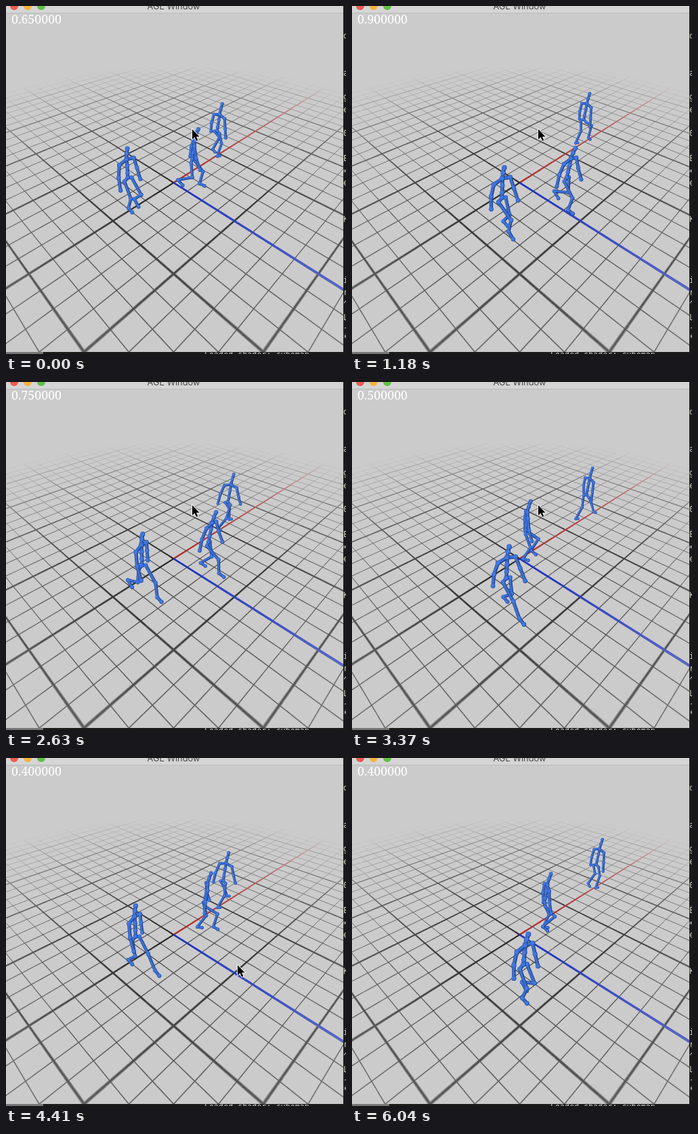
Write an HTML page with a canvas that moves like this. It is 502x514 px and loops after 6140 ms.

```html
<!DOCTYPE html>
<html>
<head>
<meta charset="utf-8">
<style>
html, body { margin: 0; width: 100%; height: 100%; overflow: hidden; background: #cbcbcb; }
canvas { display: block; }
</style>
</head>
<body>
<canvas id="stage" width="502" height="514"></canvas>
<script>
const LOOP = 6140, STEP = 147.2, CYCLE = 13.85;
const BG = 203;
const ctx = document.getElementById('stage').getContext('2d');
const backdrop = document.createElement('canvas');
backdrop.width = 502;
backdrop.height = 514;

// Camera looks at the origin along the diagonal between the red and blue axes.
const FOCAL = 431, DIST = 5.586, SIN = 0.63, COS = 0.7765;
function project(u, v, h = 0) {
  const side = u + v, ahead = u - v, up = h * Math.SQRT2;
  const depth = DIST + ahead * COS - up * SIN;
  return {
    x: 247.5 + FOCAL * side / depth,
    y: 261 - FOCAL * (ahead * SIN + up * COS) / depth,
    depth
  };
}

function line(g, a, b, width, color) {
  g.lineWidth = width;
  g.strokeStyle = color;
  g.beginPath();
  g.moveTo(a.x, a.y);
  g.lineTo(b.x, b.y);
  g.stroke();
}

function dot(g, x, y, r, color) {
  g.fillStyle = color;
  g.beginPath();
  g.arc(x, y, r, 0, 7);
  g.fill();
}

function text(g, str, x, y, font, color, align = 'left') {
  g.font = font;
  g.fillStyle = color;
  g.textAlign = align;
  g.fillText(str, x, y);
}

// One grid line, faded with the distance from the origin.
function gridLine(at, rgb, { power, width, strength }, from = -50) {
  for (let i = from; i < 50; i++) {
    const p = i / 10, q = p + 0.1;
    const fade = 1 - Math.pow(Math.hypot(at[0] * p + at[2], at[1] * p + at[3]) * Math.SQRT2 / 7, 1.3);
    if (fade <= 0) continue;
    const a = project(at[0] * p + at[2], at[1] * p + at[3]);
    const b = project(at[0] * q + at[2], at[1] * q + at[3]);
    const near = Math.min(a.depth, b.depth) / DIST;
    if (near < 0.3) continue;
    const mix = rgb.map(c => Math.round(BG + (c - BG) * fade * strength));
    line(g, a, b, width / Math.pow(near, power), `rgb(${mix})`);
  }
}

const g = backdrop.getContext('2d');
function gridLayer(bold, style) {
  for (let i = -20; i <= 20; i++) {
    if ((i % 4 === 0) !== bold) continue;
    gridLine([1, 0, 0, i / 4], [20, 20, 20], style);
    gridLine([0, 1, i / 4, 0], [20, 20, 20], style);
  }
}

function drawBackdrop() {
  g.fillStyle = `rgb(${BG},${BG},${BG})`;
  g.fillRect(0, 0, 502, 514);
  gridLayer(true, { power: 1.8, width: 2.2, strength: 0.5 });
  gridLayer(false, { power: 1, width: 1, strength: 0.8 });
  gridLayer(true, { power: 1.2, width: 1.5, strength: 0.95 });
  gridLine([1, 0, 0, 0], [200, 40, 40], { power: 1.2, width: 2, strength: 1 }, 0);
  gridLine([0, 1, 0, 0], [25, 50, 205], { power: 1.2, width: 2.3, strength: 1 }, 0);

  g.fillStyle = '#d5d5d5';
  g.fillRect(0, 0, 498, 10);
  g.fillStyle = '#bcbcbc';
  g.fillRect(0, 10, 498, 1);
  ['#f0584f', '#f5b43c', '#60c143'].forEach((c, i) => dot(g, 12 + 20 * i, 0, 6, c));
  text(g, 'AGL Window', 247.5, 5, '12.8px Inter, sans-serif', '#484848', 'center');

  g.fillStyle = '#1a1c1c';
  g.fillRect(498, 0, 4, 514);
  g.fillRect(0, 511, 502, 3);
  g.fillStyle = '#777';
  g.fillRect(0, 511, 55, 3);
  const mono = '11.7px "DejaVu Sans Mono", monospace';
  text(g, 'Loaded shader: cubemap', 293, 519, mono, '#c8c8c8');
  const rows = { 48: 'd', 103: 'a', 138: 'g', 157: 'e', 192: '0', 229: 'E', 247: '=', 265: 'e',
    319: 'K', 409: 'i', 427: 'r', 445: '^', 464: 'L', 479: '-', 494: '*' };
  for (const y in rows) text(g, rows[y], 498, +y, mono, '#d0d0b8');
}

function bones(points) {
  const width = p => 0.052 * FOCAL / p.depth;
  for (let i = 1; i < points.length; i++) {
    line(ctx, points[i - 1], points[i], width(points[i]), '#24468f');
  }
  for (const p of points) dot(ctx, p.x, p.y, width(p) * 0.64, '#264c9c');
  const lift = p => ({ x: p.x - 0.5, y: p.y - 0.4 });
  for (let i = 1; i < points.length; i++) {
    line(ctx, lift(points[i - 1]), lift(points[i]), width(points[i]) * 0.6, '#3c70d6');
  }
  for (const p of points) dot(ctx, p.x - 0.3, p.y - 0.3, width(p) * 0.5, '#4179e4');
}

// Walker at (u, v) heading along (du, dv); c is the position in the gait, 0 to 1.
function walker(u, v, du, dv, c, stride, size) {
  const len = Math.hypot(du, dv), fu = du / len, fv = dv / len;
  const at = (fwd, left, h) => project(
    u + size * (fu * fwd + fv * left), v + size * (fv * fwd - fu * left), size * h);
  const sway = Math.sin(2 * Math.PI * c);
  const hipA = 0.025, hipH = 0.43 + 0.015 * Math.cos(4 * Math.PI * c);

  function leg(side) {
    const t = (c + 0.3 + (side > 0 ? 0.5 : 0)) % 1;
    let a = 0.03, h = 0.035;
    if (t < 0.6) {
      a += stride * (0.3 - t);
      h += 0.07 * Math.max(0, (t - 0.4) / 0.2) ** 2;
    } else {
      const k = (t - 0.6) / 0.4;
      a += stride * (-0.3 + 0.6 * k * k * (3 - 2 * k));
      h += 0.07 * (1 - k) + 0.05 * Math.sin(Math.PI * k);
    }
    // The foot keeps its height and comes in where the leg is too short.
    const thigh = 0.225, shin = 0.215, drop = hipH - h;
    const far = Math.sqrt((thigh + shin - 0.001) ** 2 - drop ** 2);
    const fwd = Math.max(-far, Math.min(far, a - hipA));
    const reach = Math.hypot(fwd, drop);
    const knee = Math.atan2(fwd, drop) +
      Math.acos((thigh ** 2 + reach ** 2 - shin ** 2) / (2 * thigh * reach));
    const l = side * 0.05;
    bones([
      at(hipA, 0, hipH + 0.03),
      at(hipA, l, hipH),
      at(hipA + thigh * Math.sin(knee), l, hipH - thigh * Math.cos(knee)),
      at(hipA + fwd, l, h),
      at(hipA + fwd + 0.07, l, 0.012 + (h - 0.035) * 0.3)
    ]);
  }

  function arm(side) {
    const swing = -side * 0.27 * sway, twist = -0.3 * sway;
    const l = side * 0.097 * Math.cos(twist), a = 0.04 + side * 0.097 * Math.sin(twist);
    const elbowA = a + 0.15 * Math.sin(swing), elbowH = 0.7 - 0.15 * Math.cos(swing);
    const fore = swing + 0.15;
    bones([
      at(0.045, 0, 0.73),
      at(a, l, 0.7),
      at(elbowA, l + side * 0.03, elbowH),
      at(elbowA + 0.16 * Math.sin(fore), l + side * 0.045, elbowH - 0.16 * Math.cos(fore))
    ]);
  }

  leg(1);
  arm(1);
  bones([at(hipA, 0, hipH + 0.03), at(0.03, 0, 0.54), at(0.04, 0, 0.64),
    at(0.045, 0, 0.74), at(0.06, 0, 0.81), at(0.08, 0, 0.88)]);
  leg(-1);
  arm(-1);
}

function pointer(x, y) {
  const outline = [[0, 0], [0, 15], [3.5, 11.8], [6, 17.3], [8.4, 16.2], [6, 10.9], [10.6, 10.9]];
  ctx.beginPath();
  outline.forEach(([a, b]) => ctx.lineTo(x + a, y + b));
  ctx.closePath();
  ctx.lineWidth = 1.6;
  ctx.strokeStyle = '#fff';
  ctx.stroke();
  ctx.fillStyle = '#000';
  ctx.fill();
}

function draw(now) {
  const n = Math.floor((now % LOOP + 25) / STEP);
  const blend = Math.max(0.4, Math.min(0.65 + 0.05 * Math.max(0, n - 3), 0.95, 0.95 - 0.05 * (n - 14)));
  const c = n / CYCLE % 1;
  const mid = (n < 8 ? 0.43 + 0.068 * n : 0.974 + 0.079 * (n - 8)) % 1;

  ctx.drawImage(backdrop, 0, 0);
  ctx.lineCap = 'round';
  walker(0.85 + 0.87 * c, 0, 1, 0, c, 0.87, 0.95);
  walker(-0.03 + 0.83 * (1 - blend) * mid, -0.03 + 0.81 * blend * mid, 1 - blend, blend,
    (mid + 0.9) % 1, 0.82 * Math.hypot(blend, 1 - blend), 0.98);
  walker(-0.71, -0.04 + 0.81 * c, 0, 1, c, 0.81, 1);

  text(ctx, blend.toFixed(6), 8, 26.3, '17.8px "Noto Serif", serif', '#fff');
  if (n < 33) {
    const k = Math.max(0, Math.min(1, (n - 26) / 3));
    pointer(275 + 67 * k, 182 + 124 * k);
  }
  requestAnimationFrame(draw);
}

drawBackdrop();
requestAnimationFrame(draw);
</script>
</body>
</html>
```
